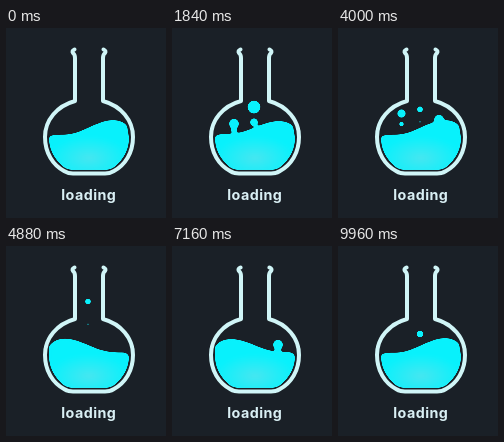
An HTML page that plays this animation: 160 px wide and 190 px high, repeating every 10000 ms.

```html
<!DOCTYPE html>
<html lang="en">
<head>
<meta charset="utf-8">
<title>Loading</title>
<style>
  html, body { margin: 0; width: 100%; height: 100%; overflow: hidden; background: #1a2027; }
  svg { display: block; width: 100vw; height: 100vh; }
  text { font: 700 14.3px Inter, sans-serif; letter-spacing: .45px; fill: #d9eff4; }
</style>
</head>
<body>
<svg viewBox="0 0 160 190">
  <defs>
    <filter id="goo" filterUnits="userSpaceOnUse" x="30" y="5" width="106" height="150" color-interpolation-filters="sRGB">
      <feGaussianBlur stdDeviation="1.5"/>
      <feColorMatrix values="1 0 0 0 0  0 1 0 0 0  0 0 1 0 0  0 0 0 8 -3.4"/>
    </filter>
    <radialGradient id="glow" gradientUnits="userSpaceOnUse" r="1" gradientTransform="translate(83 130) scale(40 22)" cx="0" cy="0">
      <stop offset="0" stop-color="#46e6f0"/>
      <stop offset="1" stop-color="#08f1fc"/>
    </radialGradient>
  </defs>
  <g id="liquid" filter="url(#goo)" fill="url(#glow)">
    <path id="pool"/>
  </g>
  <path fill="none" stroke="#d0f5f7" stroke-width="4" stroke-linecap="round" stroke-linejoin="round"
    d="M68.5 21.5Q65.5 23 67 25Q69 26.5 69 30V73C51 78 39 92 39 109C39 125 47 137 58 143Q62 145.5 67 145.5
       H99Q104 145.5 108 143C119 137 127 125 127 109C127 92 115 78 97 73V30Q97 26.5 99 25Q100.5 23 97.5 21.5"/>
  <text x="82.8" y="172" text-anchor="middle">loading</text>
</svg>
<script>
const LOOP = 10, SLOSH = 2;
const CENTER = 83, HALF = 40, LEVEL = 99.4, SWING = 7.3;
const DEPTH = 108;
const bursts = [1.35, 3.1, 7.6];

// Each rule takes the index of the launch; room is the height a bubble may climb.
const columns = [
  { launches: bursts, x: i => 62 + 1.5 * i, speed: () => 25, size: i => 5 - .7 * i, room: 30 },
  { launches: bursts, x: () => 82, speed: i => 59 / 2 ** i, size: i => (6.5 - .4 * i) / (1 + i % 2), room: 84 },
  { launches: [3.1, 6.65], x: i => 101 + 5 * i, speed: () => 18, size: () => 5, room: 26 }
];

const liquid = document.getElementById("liquid");
const pool = document.getElementById("pool");
const clamp = v => Math.max(0, Math.min(1, v));

function makeBubble(x, start, speed, size, room) {
  const circle = document.createElementNS("http://www.w3.org/2000/svg", "circle");
  circle.setAttribute("cx", x);
  liquid.append(circle);
  // Large bubbles burst sooner.
  const life = Math.min(31 / size ** 2, room / speed);
  return { circle, start, speed, size, life };
}

// Every bubble is trailed by a smaller, slower one.
const bubbles = columns.flatMap(({ launches, x, speed, size, room }) =>
  launches.flatMap((start, i) => [
    makeBubble(x(i), start, speed(i), size(i), room),
    makeBubble(x(i), start + .1, speed(i) * .6, size(i) * .6, room * .7)
  ]));

function poolPath(t) {
  const tilt = SWING * Math.cos(2 * Math.PI * t / SLOSH);
  let d = "";
  for (let u = -1; u <= 1; u += .05) {
    const y = LEVEL + 5 * u ** 8 - tilt * Math.sin(2.5 * u);
    d += `${d ? "L" : "M"}${CENTER + HALF * u} ${y}`;
  }
  return d + "L123 110C123 124 115 134 107 140Q103 142 98 142H68Q63 142 59 140C51 134 43 124 43 110Z";
}

function draw(t) {
  pool.setAttribute("d", poolPath(t));
  for (const { circle, start, speed, size, life } of bubbles) {
    const age = t - start;
    const scale = clamp(age / .3) * clamp((life - age) / .1);
    circle.setAttribute("cy", DEPTH - speed * age);
    circle.setAttribute("r", size * scale);
  }
}

const begin = performance.now();
function tick() {
  draw((performance.now() - begin) / 1000 % LOOP);
  requestAnimationFrame(tick);
}
tick();
</script>
</body>
</html>
```
